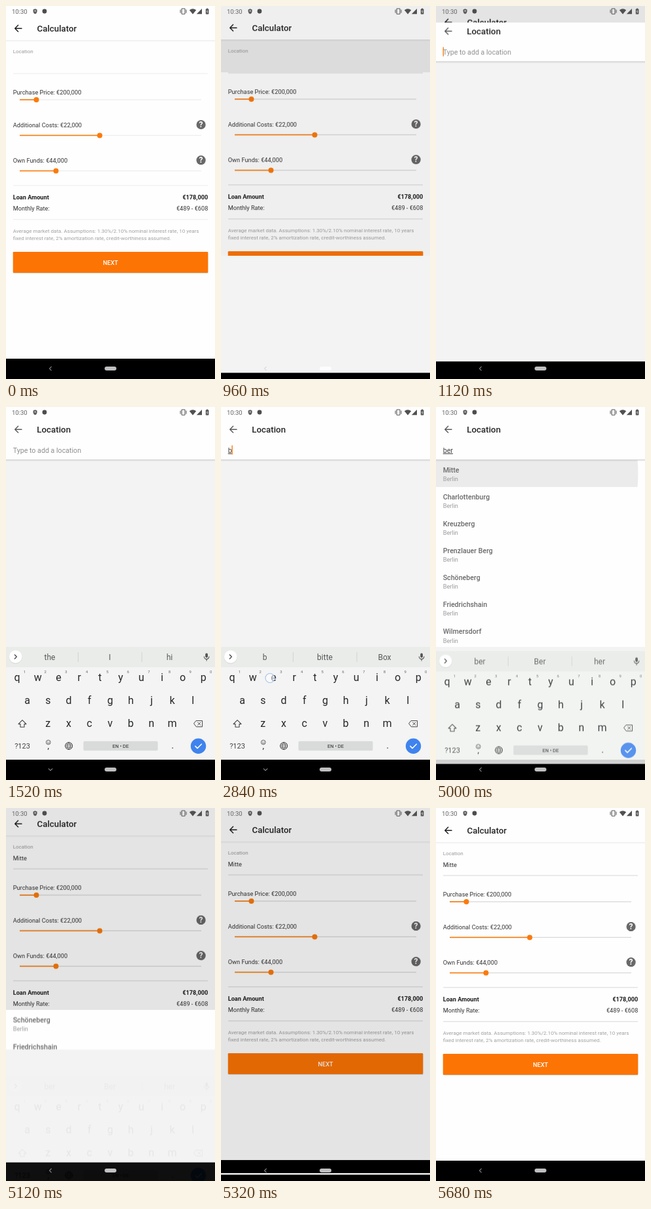
Animation of 320 by 569 pixels, one loop 6840 ms. Source, as an HTML page:

```html
<!DOCTYPE html>
<html lang="en">
<head>
<meta charset="utf-8">
<title>Loan calculator</title>
<style>
  html, body { margin: 0; width: 100%; height: 100%; overflow: hidden; background: #000; }
  #stage { position: relative; width: 320px; height: 569px; overflow: hidden; background: #000; }
  #stage div, #stage > svg, #stage div > svg { position: absolute; left: 0; top: 0; width: 320px; height: 569px; display: block; }
  text { font-family: Roboto, sans-serif; white-space: pre; }
  .m { font-weight: 500; }
  .b { font-weight: 700; }
  .c { text-anchor: middle; }
  .e { text-anchor: end; }
  .u { text-decoration: underline; }
  .o { fill: none; stroke-linecap: round; stroke-linejoin: round; }
</style>
</head>
<body>
<div id="stage"></div>
<script>
const LOOP = 6840, OPEN = 893, CLOSE = 5042, MOVE = 425;
const ORANGE = '#fb7a0c', INK = '#333', KEY = '#262727';

// Drawing helpers
const svg = (body, id = '') => `<svg id="${id}" viewBox="0 0 320 569">${body}</svg>`;
const text = (x, y, size, str, fill = INK, cls = '') =>
  `<text x="${x}" y="${y}" font-size="${size}" fill="${fill}" class="${cls}">${str}</text>`;
const rect = (x, y, w, h, fill, more = '') =>
  `<rect x="${x}" y="${y}" width="${w}" height="${h}" fill="${fill}" ${more}/>`;
const disc = (x, y, r, fill, more = '') => `<circle cx="${x}" cy="${y}" r="${r}" fill="${fill}" ${more}/>`;
const line = (d, color, w = 1) => `<path class="o" d="${d}" stroke="${color}" stroke-width="${w}"/>`;
const group = (id, body) => `<g id="${id}">${body}</g>`;
const arrow = color => line('M24 34.2H13.8M18.6 29.3L13.7 34.2L18.6 39.1', color, 1.4);
const shadow = y => [.13, .07, .03].map((a, i) => rect(0, y + i, 320, 1, '#000', `opacity="${a}"`)).join('');

// Animation helpers: rows are [ms, declarations, easing to the next row]
let css = '';
const key = (id, ...rows) => {
  rows.push([LOOP, rows[rows.length - 1][1]]);
  const body = rows.map(([ms, decl, ease = 'linear']) =>
    `${(ms / LOOP * 100).toFixed(3)}%{${decl};animation-timing-function:${ease}}`).join('');
  css += `@keyframes ${id}{${body}}#${id}{animation:${id} ${LOOP}ms infinite}\n`;
};
const show = (id, ...spans) => key(id, [0, 'opacity:0', 'step-end'],
  ...spans.flatMap(([a, b]) => [[a, 'opacity:1', 'step-end'], [b, 'opacity:0', 'step-end']]));

// Calculator screen
const slider = (y, x) => rect(21, y - .6, 278, 1.2, '#d6d7d6', 'class="rule"') +
  rect(21, y - .8, x - 21, 1.6, ORANGE) + disc(x, y, 4, ORANGE);
const help = y => disc(298.6, y, 7.1, '#696969') + text(298.6, y + 4.2, 12, '?', '#fff', 'c b');
const rule = y => rect(11, y - .5, 298, 1, '#d6d7d6', 'class="rule"');

const calc = rect(0, 0, 320, 538, '#fdfefd') + rect(0, 0, 320, 52, '#fefefe') +
  `<g opacity=".45">${shadow(52)}</g>` + rect(0, 538, 320, 31, '#000') +
  `<svg x="0" y="52" width="320" height="50"><circle id="fieldRipple" cx="150" cy="30" r="0"/></svg>` +
  arrow('#1c1c1c') + text(47.5, 38.8, 13.3, 'Calculator', '#252525', 'm') +
  text(10.7, 72.2, 8, 'Location', '#989998') +
  group('place', text(10.7, 89.8, 9.25, 'Mitte')) + rule(103) +
  text(10.7, 134.6, 9.25, 'Purchase Price: €200,000') + slider(143, 46.5) +
  text(10.7, 184.5, 9.25, 'Additional Costs: €22,000') + help(181) + slider(197.4, 143.5) +
  text(10.7, 238.6, 9.25, 'Own Funds: €44,000') + help(235.2) + slider(251.5, 76.5) + rule(273.8) +
  text(10.7, 294.6, 9.2, 'Loan Amount', '#1c1c1c', 'b') + text(309.3, 294.6, 9.2, '€178,000', '#1c1c1c', 'b e') +
  text(10.7, 312.4, 9.2, 'Monthly Rate:') + text(309.3, 312.4, 9.2, '€489 - €608', INK, 'e') + rule(325.8) +
  text(10.7, 345.6, 8.04, 'Average market data. Assumptions: 1.30%/2.10% nominal interest rate, 10 years', '#a0a1a0') +
  text(10.7, 356.9, 8.04, 'fixed interest rate, 2% amortization rate, credit-worthiness assumed.', '#a0a1a0') +
  rect(11, 376, 298.5, 32, '#000', 'rx="1.5" opacity=".13"') + rect(10.7, 375, 298.6, 32, '#fc7404', 'rx="1.3"') +
  text(160, 394.5, 9.2, 'NEXT', '#fff', 'c m');

// Location screen
const towns = ['Mitte', 'Charlottenburg', 'Kreuzberg', 'Prenzlauer Berg', 'Schöneberg', 'Friedrichshain', 'Wilmersdorf'];
const rows = towns.map((name, i) => text(10.7, 18.7 + i * 41.1, 10.67, name, '#696a69', 'm') +
  text(10.7, 31.9 + i * 41.1, 9.2, 'Berlin', '#9a9b9a')).join('');
const typed = ['b', 'be', 'ber'];
const caretX = [11.2, 17.1, 22.8, 26.3];

const loc = rect(0, 0, 320, 538, '#f2f3f2') + rect(0, 538, 320, 31, '#000') +
  `<svg id="list" x="0" y="81" width="320" height="285">${rect(0, 0, 320, 285, '#fdfefd')}
    <svg width="320" height="41"><circle id="rowRipple" cx="60" cy="20" r="0"/></svg>${group('rows', rows)}</svg>` +
  rect(0, 0, 320, 80, '#fefefe') + shadow(80) + arrow('#5a5a5a') +
  text(47.3, 38.8, 13.3, 'Location', '#252525', 'm') +
  group('hint', text(10.7, 69.7, 10.67, 'Type to add a location', '#8d8e8d')) +
  typed.map((s, i) => group('typed' + i, text(10.7, 69.7, 10.67, s, '#444', 'u'))).join('') +
  caretX.map((x, i) => group('caret' + i, rect(x - .7, 58.5, 1.4, 14, ORANGE))).join('');

// Keyboard
const PITCH = 31.7;
const letters = (str, x, y) => [...str].map((ch, i) => text(x + i * PITCH, y, 16, ch, KEY, 'c')).join('');
const words = [['the', 'I', 'hi'], ['b', 'bitte', 'Box'], ['be', 'bei', 'Be'], ['ber', 'Ber', 'her']];
const presses = [[2240, 191, 483, 190, 484], [2840, 80.4, 413, 75, 413.5], [3280, 112, 413, 109, 413.5]];

const ime = rect(0, 366, 320, 172, '#f3f4f3') + rect(0, 366, 320, 31, '#eaecea') +
  presses.map(([, x, y], i) => group('press' + i, rect(x - 14, y - 16, 28, 32, '#e4e6e5', 'rx="3"'))).join('') +
  disc(14.7, 381.7, 10, '#000', 'opacity=".1"') + disc(14.7, 381, 9.8, '#fff') +
  line('M13.3 378L16.3 381L13.3 384', '#444', 1.3) +
  rect(110, 374, 1, 15, '#d2d4d3') + rect(207.5, 374, 1, 15, '#d2d4d3') +
  words.map((set, n) => group('words' + n,
    set.map((w, i) => text([67, 159, 250.5][i], 385.6, 12, w, '#565857', 'c')).join(''))).join('') +
  rect(305.2, 375.5, 3.8, 7, '#555', 'rx="1.9"') + line('M303.3 380.8a3.8 3.8 0 0 0 7.6 0M307.1 384.8V387', '#555', 1.1) +
  letters('qwertyuiop', 17, 417.6) + letters('asdfghjkl', 32.6, 452.6) + letters('zxcvbnm', 64.2, 487.6) +
  [...'1234567890'].map((d, i) => text(28.5 + i * PITCH, 406.3, 6, d, '#666', 'c')).join('') +
  line('M25 477.7L31 483.6H28V488.3H22V483.6H19Z', '#444', 1.1) +
  line('M291.3 478.6H300.6V487.8H291.3L287.8 483.2ZM293.6 481.1L297.8 485.3M297.8 481.1L293.6 485.3', '#444', 1) +
  text(25, 521, 11, '?123', '#444', 'c') +
  disc(64.8, 511.5, 3.4, 'none', 'stroke="#555" stroke-width=".9"') +
  line('M63 512.4q1.8 1.8 3.6 0M63.6 510.5v.1M66 510.5v.1', '#555', .9) + text(64.8, 521, 13, ',', KEY, 'c') +
  disc(96.2, 517, 5.5, 'none', 'stroke="#444"') +
  line('M90.7 517H101.7M91.6 514.3H100.8M91.6 519.7H100.8M96.2 511.5q-5 5.5 0 11q5 -5.5 0 -11', '#444', .8) +
  rect(118.5, 509.7, 114, 14.6, '#d9dbda', 'rx="2"') + text(175.5, 519.7, 7.5, 'EN • DE', KEY, 'c') +
  text(255, 521.4, 14, '.', KEY, 'c') +
  disc(294.5, 517.2, 11.7, '#3f83ee') + line('M289.8 517.4L293 520.6L299.4 514.2', '#fff', 1.5);

// Status and navigation icons
const sys = text(9, 11.5, 9.5, '10:30', '#626362') +
  `<path d="M44.6 4.3l3 1.1v2.8q0 2.6-3 4q-3-1.4-3-4v-2.8z" fill="#5c5d5c"/>` + disc(44.6, 7.6, 1, '#eee') +
  disc(59, 8, 3.4, '#4c4d4c') +
  rect(269, 4, 5, 8.2, 'none', 'rx=".8" stroke="#555" stroke-width="1.1"') +
  line('M267 6V10.2M276 6V10.2', '#555', 1) +
  `<path d="M280.8 6.3q5.2-4 10.4 0L286 12.4z M300 3.9V12.2H291.8z" fill="#505150"/>` +
  rect(305.8, 4.6, 4.6, 7.8, '#505150', 'rx=".7"') + rect(307, 3.7, 2.2, 1.4, '#505150') +
  line('M308.4 6.4L307.2 8.6H309L307.9 10.6', '#eee', .7) +
  rect(151, 550.1, 18, 6, '#fff', 'rx="3" opacity=".75"') +
  group('back', line('M69.4 550.2L66.6 553.1L69.4 556', '#ccc', 1)) +
  group('down', line('M65.2 551.8L68.1 554.6L71 551.8', '#ccc', 1));

// Touch marks: start, end, x, y
const taps = [[560, 720, 150, 82], ...presses.map(([t, , , x, y]) => [t, t + 130, x, y]), [4760, 4890, 60, 101]];
const marks = taps.map(([, , x, y], i) =>
  group('tap' + i, disc(x, y, 7, '#fff', 'fill-opacity=".55" stroke="#a5c1ea" stroke-width="1.1"'))).join('');

document.getElementById('stage').innerHTML =
  svg(calc, 'calc') +
  `<div id="loc"><div id="reveal">${svg(loc, 'locArt')}</div></div>` +
  svg(ime, 'ime') + svg(sys) + svg(marks);

// Screen transitions
const STD = 'cubic-bezier(.4,0,.2,1)', FAST = 'cubic-bezier(.3,0,.8,.15)', SLOW = 'cubic-bezier(.05,.7,.1,1)';
const pose = (y, a) => `transform:translateY(${y}px);opacity:${a}`;
const shift = y => `transform:translateY(${y}px)`;
const cut = y => `clip-path:inset(${y}px 0 0 0)`;
const CUT = 545.7, DROP = 23.3;

css += '#calc{isolation:isolate}\n';
key('calc', [0, shift(0)], [OPEN, shift(0), STD], [OPEN + MOVE, shift(-11.4)],
  [CLOSE, shift(-11.4), STD], [CLOSE + MOVE, shift(0)]);
key('fade', [0, 'opacity:1'], [OPEN, 'opacity:1'], [OPEN + 117, 'opacity:.9'],
  [CLOSE + 308, 'opacity:.9'], [CLOSE + MOVE, 'opacity:1']);
css += `#calc{animation:calc ${LOOP}ms infinite,fade ${LOOP}ms infinite}\n`;
key('loc', [0, shift(DROP)], [OPEN, shift(DROP), STD], [OPEN + MOVE, shift(0)],
  [CLOSE, shift(0), STD], [CLOSE + MOVE, shift(DROP)]);
key('reveal', [0, cut(CUT)], [OPEN, cut(CUT), FAST], [OPEN + MOVE / 6, cut(CUT * .6), SLOW], [OPEN + MOVE, cut(0)],
  [CLOSE, cut(0), FAST], [CLOSE + MOVE / 6, cut(CUT * .4), SLOW], [CLOSE + MOVE, cut(CUT)]);
show('locArt', [OPEN, CLOSE + MOVE]);
key('ime', [0, pose(46, 0)], [1190, pose(46, 0), 'cubic-bezier(0,0,.2,1)'], [1420, pose(0, 1)],
  [4980, pose(0, 1)], [5130, pose(46, 0)]);
show('back', [0, 1190], [5000, LOOP]);
show('down', [1190, 5000]);

// Ripples and touches
const ripple = (id, t, end) => key(id, [0, 'r:0px;opacity:0', 'step-end'], [t, 'r:8px;opacity:.03', 'ease-out'],
  [t + 260, 'r:270px;opacity:.075', 'step-end'], [end, 'r:0px;opacity:0', 'step-end']);
ripple('fieldRipple', 620, 1400);
ripple('rowRipple', 4800, CLOSE + 20);
taps.forEach(([a, b], i) => show('tap' + i, [a, b]));
presses.forEach(([t], i) => show('press' + i, [t + 40, t + 170]));

// Typing, suggestions and results
show('hint', [0, 2320]);
[2320, 2920, 3360, LOOP].forEach((t, i, all) => i < 3 && show('typed' + i, [t, all[i + 1]]));
[0, 2440, 3040, 3440, LOOP].forEach((t, i, all) => i < 4 && show('words' + i, [t, all[i + 1]]));
show('caret0', [920, 1420], [1920, 2320]);
show('caret1', [2320, 2920]);
show('caret2', [2920, 3360]);
show('caret3', [3360, 3920], [4400, 4900]);
show('list', [3520, LOOP]);
show('place', [5000, LOOP]);
key('rows', [0, shift(0), 'step-end'], [CLOSE, shift(60.5), 'step-end']);
css += '@keyframes pale{0%{fill:#ebeeed;animation-timing-function:step-end}8.187%,100%{fill:#d6d7d6}}' +
  `.rule{animation:pale ${LOOP}ms infinite}`;

const style = document.createElement('style');
style.textContent = css;
document.head.append(style);
</script>
</body>
</html>
```
